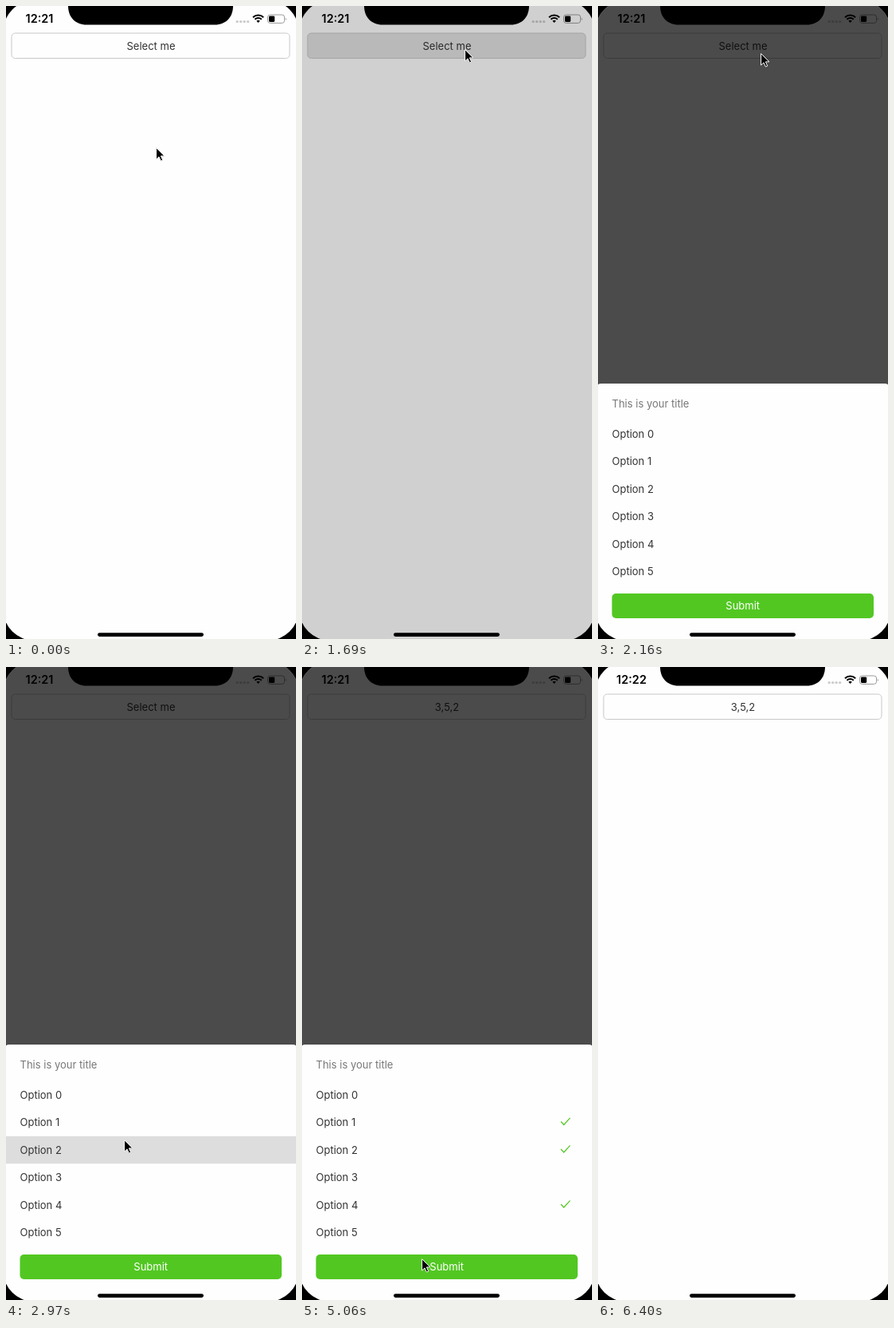
Recreate the animation shown at these times as an HTML page. Size 364 px wide and 793 px high, loop 7600 ms.

```html
<!DOCTYPE html>
<html lang="en">
<head>
<meta charset="utf-8">
<title>Option sheet</title>
<style>
  html, body { margin: 0; width: 100%; height: 100%; overflow: hidden; background: #000; }
  svg { display: block; width: 364px; height: 793px; font: 13px Inter, Roboto, sans-serif; fill: #333; }
  #clock { font-size: 14.5px; font-weight: 600; fill: #000; }
  .mid { text-anchor: middle; }
  .check { fill: none; stroke: #52c722; stroke-width: 1.2; }
  #cursor { filter: drop-shadow(0 .7px .7px #0006); }
</style>
</head>
<body>
<svg viewBox="0 0 364 793">
  <clipPath id="screen"><rect x="-3.5" y="-7" width="371" height="802" rx="39"/></clipPath>
  <g clip-path="url(#screen)">
    <rect width="364" height="793" fill="#fefefe"/>
    <text id="clock" class="mid" x="42" y="21.3"></text>
    <g fill="#ccc">
      <circle cx="290.2" cy="19.6" r="1.7"/><circle cx="294.7" cy="19.6" r="1.7"/>
      <circle cx="299.2" cy="19.6" r="1.7"/><circle cx="303.7" cy="19.6" r="1.7"/>
    </g>
    <g fill="none" stroke="#000" stroke-width="2">
      <path d="M310 14.2a9.4 9.4 0 0 1 13.2 0M312.4 16.8a6 6 0 0 1 8.4 0"/>
      <path d="M316.6 21l-2.2-2.3a3.2 3.2 0 0 1 4.4 0z" fill="#000" stroke="none"/>
    </g>
    <rect x="328.5" y="11" width="21" height="10.4" rx="3" fill="none" stroke="#999"/>
    <rect x="330" y="12.5" width="7.2" height="7.4" rx="1.3" fill="#000"/>
    <path d="M350.8 14.4q2 1.8 0 3.6z" fill="#999"/>
    <rect id="button" x="7" y="34" width="349" height="31.5" rx="4.5" stroke="#c8c8c8"/>
    <text id="value" class="mid" x="182" y="54.5"></text>
    <rect id="dim" width="364" height="793"/>
    <g id="sheet">
      <rect x="-3" y="473" width="370" height="330" rx="7" fill="#fefefe"/>
      <text x="17.5" y="502.5" fill="#777">This is your title</text>
      <g id="rows"></g>
      <rect x="17.5" y="736" width="328.5" height="31" rx="5" fill="#52c722"/>
      <text class="mid" x="181.7" y="756.3" fill="#fff">Submit</text>
    </g>
    <rect x="115" y="785.2" width="133" height="4.8" rx="2.4" fill="#000"/>
    <path d="M78-4v4c0 14 9 23.5 23 23.5H262c14 0 23-9.5 23-23.5v-4z" fill="#000"/>
  </g>
  <path id="cursor" d="M.6.6v14.5l3.4-3.2 2.4 5.2 2.3-1-2.3-5.2h4.6z" fill="#000" stroke="#fff"/>
</svg>
<script>
const LOOP = 7600, OPEN = 1590, CLOSE = 5392, SLIDE = 300, TRAVEL = 840;
const $ = id => document.getElementById(id);

// row index -> press start; the choice lands when the press ends
const presses = { 2: 2970, 4: 3670, 1: 4430 }, HOLD = 120;

// time, x, y of the pointer
const path = [
  [0, 188, 177], [30, 188, 177], [270, 178, 213], [520, 198, 132], [640, 194, 142],
  [850, 194, 142], [1280, 204, 54], [2100, 204, 54], [2160, 204, 59], [2680, 148, 592],
  [3230, 148, 592], [3500, 147, 657], [3670, 147, 657], [4190, 148, 562],
  [4490, 148, 562], [5060, 150, 741], [5170, 153, 747], [5230, 155, 749],
  [6120, 155, 749], [6400, 368, 740], [LOOP, 368, 740]
];

$('rows').innerHTML = [...Array(6).keys()].map(i => {
  const y = 536 + 34.5 * i;
  return `<rect id="row${i}" x="0" y="${y - 17.25}" width="364" height="34.5" fill="#ddd"/>
    <text x="17.5" y="${y + 4.8}">Option ${i}</text>
    <path id="check${i}" class="check" d="M325 ${y - 1}l3.7 4 7.8-8.6"/>`;
}).join('');

const clamp = v => Math.min(1, Math.max(0, v));
const smooth = v => v * v * (3 - 2 * v);
const easeIn = v => v ** 1.66;
const inOut = v => v < .5 ? easeIn(2 * v) / 2 : 1 - easeIn(2 - 2 * v) / 2;
const elastic = v => 1 - Math.cos(v * Math.PI / 2) ** 3 * Math.cos(v * .8 * Math.PI);
const within = (t, start, length) => t >= start && t < start + length;
const show = (id, on) => $(id).setAttribute('visibility', on ? 'inherit' : 'hidden');

function pointer(t) {
  const i = path.findIndex(p => p[0] > t);
  const [t0, x0, y0] = path[i - 1], [t1, x1, y1] = path[i];
  const k = smooth((t - t0) / (t1 - t0));
  return [x0 + (x1 - x0) * k, y0 + (y1 - y0) * k];
}

function draw(t) {
  const opening = clamp((t - OPEN) / SLIDE), closing = clamp((t - CLOSE) / SLIDE);
  $('dim').setAttribute('fill', '#000');
  $('dim').setAttribute('opacity', .7 * (inOut(opening) - inOut(closing)));
  const raised = elastic(opening) - inOut(closing);
  $('sheet').setAttribute('transform', `translate(0 ${TRAVEL * (1 - raised)})`);

  const chosen = [2, 4, 1].filter(i => t >= presses[i] + HOLD);
  for (let i = 0; i < 6; i++) {
    show('row' + i, within(t, presses[i], HOLD));
    show('check' + i, chosen.includes(i));
  }
  $('value').textContent = chosen.map(i => i + 1).join() || 'Select me';
  $('clock').textContent = t < 5410 ? '12:21' : '12:22';
  $('button').setAttribute('fill', within(t, 1570, 190) ? '#e2e2e2' : '#fefefe');
  $('cursor').setAttribute('transform', `translate(${pointer(t)})`);
}

const start = performance.now();
function tick() {
  draw((performance.now() - start) % LOOP);
  requestAnimationFrame(tick);
}
tick();
</script>
</body>
</html>
```
